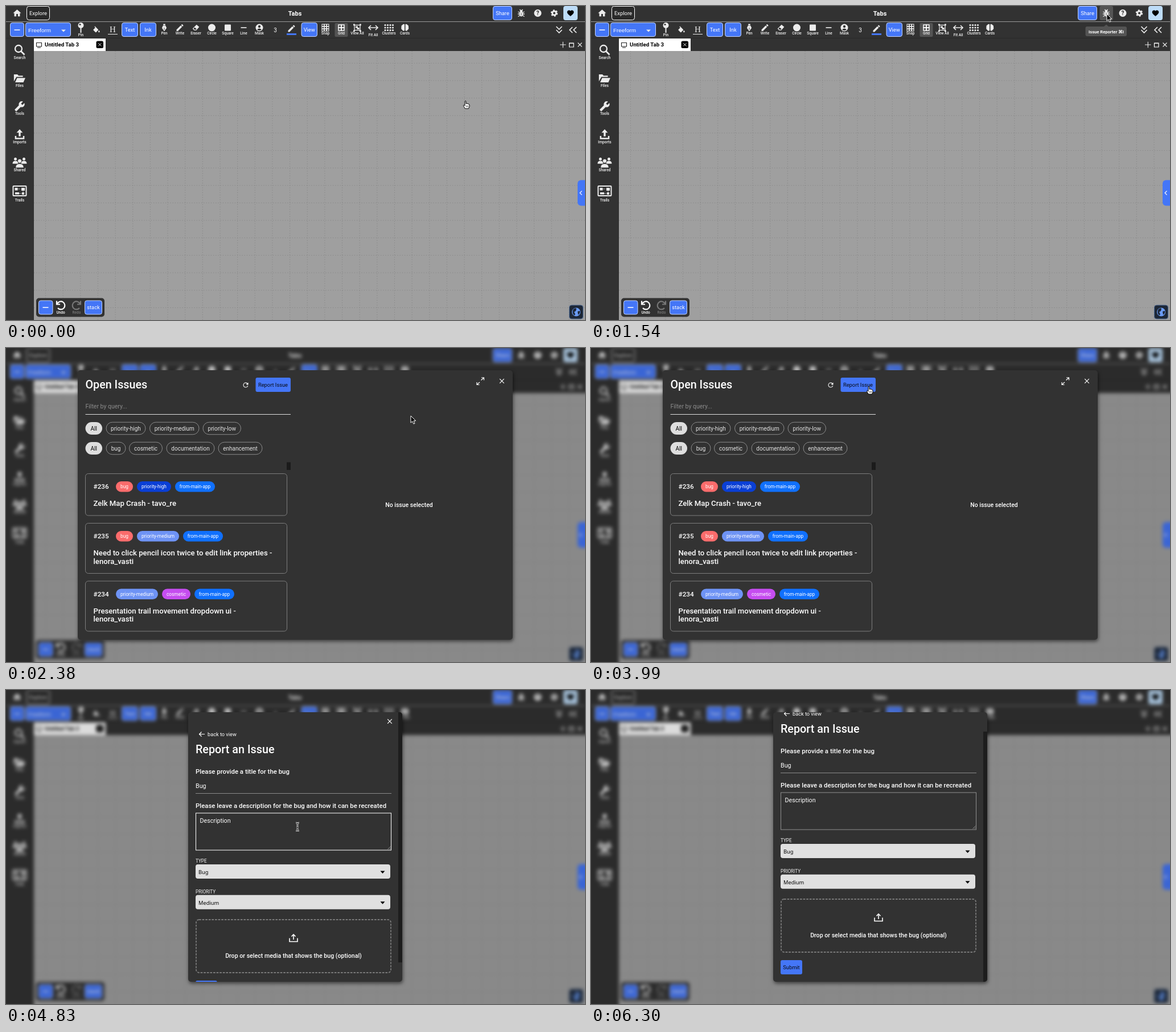
Recreate the animation shown at these times as an HTML page. Size 1017x551 px, loop 6650 ms.

```html
<!DOCTYPE html>
<html lang="en">
<head>
<meta charset="utf-8">
<title>Issue reporter</title>
<style>
  html, body { margin: 0; width: 100%; height: 100%; overflow: hidden; background: #323232; }
  svg { display: block; font-family: Roboto, "Open Sans", sans-serif; }
  .modal { filter: drop-shadow(1px 3px 3px rgba(0, 0, 0, .55)); }
</style>
</head>
<body>
<svg id="stage" width="1017" height="551" viewBox="0 0 1017 551"></svg>
<script>
const DARK = '#323232', BLUE = '#4476f7', ICON = '#ececec';

// Drawing helpers: each returns SVG markup
const rect = (x, y, w, h, fill, r = 0, more = '') =>
  `<rect x="${x}" y="${y}" width="${w}" height="${h}" rx="${r}" fill="${fill}" ${more}/>`;
const text = (x, y, str, size, fill = '#fff', more = '') =>
  `<text x="${x}" y="${y}" font-size="${size}" fill="${fill}" ${more}>${str}</text>`;
const mid = (x, y, str, size, fill = '#fff', more = '') =>
  text(x, y, str, size, fill, 'text-anchor="middle" ' + more);
const line = (d, color = ICON, width = 1, more = '') =>
  `<path d="${d}" fill="none" stroke="${color}" stroke-width="${width}" ${more}/>`;
const shape = (d, fill = ICON) => `<path d="${d}" fill="${fill}"/>`;
const dot = (x, y, r, fill = ICON) => `<circle cx="${x}" cy="${y}" r="${r}" fill="${fill}"/>`;
const icon = (d, x, y, size, fill = ICON, flip = 1) =>
  `<path d="${d}" fill="${fill}" transform="translate(${x} ${y}) scale(${flip * size / 24} ${size / 24}) translate(-12 -12)"/>`;
const cross = (x, y, r, color = '#fff', w = 1.2) =>
  line(`M${x - r} ${y - r}l${2 * r} ${2 * r}m0 ${-2 * r}l${-2 * r} ${2 * r}`, color, w);
const button = (x, y, w, h, label) =>
  rect(x + .5, y + .5, w - 1, h - 1, BLUE, 3.5, 'stroke="#c3d3ff"') +
  mid(x + w / 2, y + h / 2 + 3.3, label, 9.3);
const minus = (x, y, w = 5) => line(`M${x - w} ${y}h${2 * w}`, '#fff', 1.5);
const medium = 'font-weight="500"', bold = 'font-weight="700"';

const PENCIL = 'M3 17.2V21h3.8L17.8 9.9 14 6.2zM20.7 7a1 1 0 000-1.4l-2.3-2.3a1 1 0 00-1.4 0l-1.8 1.8 3.8 3.8z';
const HOME = 'M10 20v-6h4v6h5v-8h3L12 3 2 12h3v8z';
const HEART = 'M12 21C5 15 2 12.3 2 8.500 2 5.400 4.400 3 7.500 3 9.200 3 11 3.800 12 5.100 13 3.800 14.800 3 16.500 3 19.600 3 22 5.400 22 8.500 22 12.300 19 15 12 21z';
const BUCKET = 'M16.600 9 7.600 0 6.200 1.400 8.600 3.800 3.400 9a1.500 1.500 0 0 0 0 2.100l5.500 5.500c.6.6 1.500.6 2.100 0l5.500-5.500c.6-.6.6-1.500.1-2.100zM19 11.500s-2 2.200-2 3.500a2 2 0 0 0 4 0c0-1.300-2-3.500-2-3.500z';
const WRENCH = 'M22.700 19l-9.100-9.100c.9-2.300.4-5-1.500-6.900-2-2-5-2.400-7.400-1.300L9 6 6 9 1.600 4.700C.4 7.100.9 10.100 2.900 12.100c1.900 1.900 4.600 2.400 6.900 1.500l9.100 9.100c.4.4 1 .4 1.400 0l2.300-2.300c.5-.4.5-1.100.1-1.400z';
const FOLDER = 'M3.500 20 7.500 11H24l-4 9zM1 18V4h7l2.500 2.500H19V9H6z';
const REFRESH = 'M17.650 6.350A8 8 0 1 0 19.700 14h-2.100A6 6 0 1 1 12 6c1.700 0 3.100.7 4.200 1.800L13 11h7V4z';
const UPLOAD = 'M12 1 5.500 8H10v8h4V8h4.500zM2 15v7h20v-7h-3v4H5v-4z';
const PEN = 'M9 1h6v4H9zM8 6h8l3 7-7 10-7-10zM11.300 12v7h1.400v-7z';
const ERASER = 'M14 3l8 7-9 10H7l-5-5zM8 11l-3 4 3 3h4l2-2z';

function person(x, y, r) {
  return dot(x, y, r) + shape(`M${x - 2 * r} ${y + r * 3.300}q0 ${-r * 2} ${2 * r} ${-r * 2}t${2 * r} ${r * 2}z`);
}

function gridOf(x, y, cols, rows, gap, draw) {
  let out = '';
  for (let i = 0; i < cols * rows; i++) out += draw(x + (i % cols) * gap, y + (i / cols | 0) * gap);
  return out;
}

function board() {
  let d = '';
  for (let x = 69.500; x < 1017; x += 30.650) d += `M${x} 79V551`;
  for (let y = 100.300; y < 551; y += 30.650) d += `M49 ${y}H1017`;
  return rect(49, 79, 1000, 510, '#9f9f9f') + line(d, '#858585', .9, 'stroke-dasharray="1.3 2.9"');
}

function topBar() {
  const gear = dot(963, 12.500, 4.800) +
    `<circle cx="963" cy="12.500" r="5.200" fill="none" stroke="${ICON}" stroke-width="2.200" stroke-dasharray="2.700 2.745"/>` +
    dot(963, 12.500, 1.900, DARK);
  const bug = `<ellipse cx="905" cy="14" rx="3.200" ry="4.300" fill="${ICON}"/>` + dot(905, 9.300, 2.300) +
    line('M899.500 10l3 2m5 0l3-2M899 14h12M899.500 18.500l3-2m5 0l3 2M902.500 6l1.500 2m2 0l1.500-2', ICON, 1.300) +
    line('M904 13h2m-2 2.500h2', DARK, .9);
  return icon(HOME, 19.500, 12.500, 17) +
    rect(36.500, .5, 40, 24, '#2a2a2a', 4, 'stroke="#fff"') + mid(56.500, 16, 'Explore', 9.400) +
    mid(507.500, 16.500, 'Tabs', 11, '#fff', bold) +
    button(855, 0, 34, 25, 'Share') +
    '<g id="hover">' + rect(893.500, 0, 23.500, 25, '#545454', 3) + '</g>' + bug +
    dot(934, 12.500, 6.500) + mid(934, 16, '?', 10, DARK, bold) + gear +
    rect(979, 0, 25, 25, '#bddcf8', 4) + icon(HEART, 991.500, 12.700, 14, '#000') +
    rect(0, 27, 1017, 1, '#999');
}

function toolBar() {
  const label = (x, str, y = 50) => mid(x, y, str, 6.500, '#f2f2f2', medium);
  const names = [[278, 'Pen'], [305.500, 'Write'], [333.500, 'Eraser'], [361.500, 'Circle'], [389.500, 'Square'],
    [417.500, 'Line'], [445, 'Mask'], [561, 'Snap'], [617, 'View All'], [672.500, 'Clusters'], [700.500, 'Cards']];
  return button(7, 29, 25, 25, '') + minus(19.500, 42) +
    button(34, 29, 80, 25, '') +
    text(39, 46, 'Freeform', 9.900, '#fff', 'font-family="Liberation Sans, Arial, sans-serif"') +
    shape('M97 41.500h8l-4 4z') +
    dot(131.500, 34, 5) + dot(130, 32.500, 1.500, DARK) + rect(130.500, 38, 2, 9, ICON) + label(131.500, 'Pin', 53) +
    icon(BUCKET, 159, 43, 15) +
    mid(187.500, 46, 'H', 15, ICON, 'font-family="Liberation Serif, Noto Serif, serif"') + line('M179 49.500h17') +
    button(203, 29, 29, 25, 'Text') + button(235, 29, 29, 25, 'Ink') +
    rect(577.500, 30, 23, 24, '#545454', 2) + names.map(([x, s]) => label(x, s)).join('') +
    label(589, 'Grid') + label(645, 'Fit All', 53) +
    icon(PEN, 278, 38, 14, ICON) + icon(PENCIL, 305.500, 38, 16) + icon(ERASER, 333.500, 38, 14) +
    dot(361.500, 38, 6.500) + rect(384, 32.500, 11, 11, ICON, 1) + minus(417.500, 38) +
    dot(445, 38, 6.500) + dot(445, 36, 2.200, DARK) + shape('M441 41.500q4-4 8 0q-4 3-8 0z', DARK) +
    mid(473, 45.500, '3', 10) + icon(PENCIL, 501.500, 39.500, 16) + rect(493, 48, 17, 3, BLUE) +
    button(518.500, 29, 28.500, 25, 'View') +
    gridOf(555, 32, 3, 3, 4.200, (x, y) => rect(x, y, 3.600, 3.600, 'none', 0, `stroke="${ICON}" stroke-width="1.100"`)) +
    gridOf(584, 33, 2, 2, 5, (x, y) => rect(x, y, 5, 5, 'none', 0, 'stroke="#fff" stroke-width="1.400"')) +
    rect(612, 33.500, 10, 9, 'none', 0, `stroke="${ICON}" stroke-width="1.300"`) + rect(614, 35.500, 4, 3, ICON) + rect(616.500, 38, 4, 3, ICON) +
    gridOf(610, 31.500, 2, 2, 11, (x, y) => rect(x, y, 2.800, 2.800, ICON)) +
    line('M637.500 38h15M641 34l-4 4 4 4M649 34l4 4-4 4', ICON, 1.700) +
    gridOf(666, 33.500, 4, 3, 4.500, (x, y) => dot(x, y, 1.600)) +
    shape('M700 32q-2-1-3.500 1-2.500 1-2 4-1 3 1.500 5 2 3 4 1zM701.500 32q2-1 3.500 1 2.500 1 2 4 1 3-1.500 5-2 3-4 1z') +
    line('M966.500 36l5 5 5-5m-10 6l5 5 5-5M995 37l-5 5 5 5m7-10l-5 5 5 5', ICON, 1.700);
}

function tabRow() {
  return rect(0, 56, 1017, .8, '#292929') + rect(49, 57, 126, 22, '#fff') +
    line('M53.500 64.500h9v6.500h-9zM55 73h6', '#222', 1.100) +
    text(68, 71, 'Untitled Tab 3', 9.700, '#000', bold) +
    rect(158.500, 61.500, 12.500, 12.500, '#000', 2.500) + cross(164.800, 67.800, 2.600, '#fff', .9) +
    line('M973 68h10.500M978.300 62.700v10.500', ICON, 1.100) +
    line('M989.500 65h7.500v7h-7.500zM989.500 65.500h7.500', '#fff', 1.200) + cross(1008, 68, 3.500, ICON, 1.100);
}

function sideBar() {
  const labels = [[93, 'Search'], [142, 'Files'], [191, 'Tools'], [240.500, 'Imports'], [290, 'Shared'], [342.500, 'Trails']];
  return labels.map(([y, s]) => mid(24, y, s, 6.700, '#f2f2f2', medium)).join('') +
    `<circle cx="22" cy="75" r="6" fill="none" stroke="${ICON}" stroke-width="2.300"/>` + line('M26.500 79.500l6 6', ICON, 2.600) +
    icon(FOLDER, 23.500, 127, 21) + icon(WRENCH, 24, 176, 19, ICON, -1) + icon(UPLOAD, 24, 225.500, 20) +
    person(16.500, 268.500, 2.500) + person(31.500, 268.500, 2.500) +
    `<g stroke="${DARK}" stroke-width=".8">${person(24, 272, 3.600)}</g>` +
    rect(12.500, 316, 23, 17, 'none', 1, `stroke="${ICON}" stroke-width="2"`) +
    rect(15.500, 319, 5, 4.500, ICON) + rect(27, 319, 6, 5, ICON) + rect(16, 327, 7, 3.500, ICON) + rect(28, 327, 4, 4, ICON) +
    line('M21 321h5m4 3.500v2M23 329h5', ICON, .9, 'stroke-dasharray="1.500 1"');
}

function corners() {
  const turn = (x, color, flip) => `<g transform="translate(${x} 525) scale(${flip} 1)">` +
    line('M-7-7.500v6h6M-6-2.500A7 7 0 1 1-5 5', color, 2.200) + '</g>';
  return rect(53, 512.500, 120, 33, DARK, 5) + button(57, 516.500, 25.500, 25, '') + minus(69.500, 529) +
    turn(96, '#fff', 1) + mid(96, 540, 'Undo', 6.500, '#fff', medium) +
    turn(124, '#777', -1) + mid(124, 540, 'Redo', 6.500, '#777', medium) +
    button(138, 516.500, 31, 25, 'stack') +
    rect(1004, 305.500, 40, 45, BLUE, 6) + line('M1011.500 324.500l-3.500 3.500 3.500 3.500', '#fff', 1.100) +
    rect(989.500, 525, 24, 24, '#1d2736', 4, 'stroke="#48658f"') + dot(1001.500, 537, 7.500, '#6a9bf5') +
    shape('M996 533q3-4 6-2l-1 4-3 2 2 4-2 2q-4-4-2-10zM1004 536l4-1q1 4-3 7z', '#1d2736');
}

function pill(x, y, w, h, label, size, fill, color, stroke = 'none') {
  return rect(x, y - h / 2, w, h, fill, h / 2, `stroke="${stroke}"`) + mid(x + w / 2, y + size * .35, label, size, color);
}

function issueList() {
  const TAG = {
    bug: [30, '#fb6c6c'], 'priority-high': [60, '#0a3fd6'], 'priority-medium': [74, '#6e93f5'],
    cosmetic: [50, '#c64df0'], 'from-main-app': [70, '#1070fd'],
  };
  const card = (y, h, id, tags, lines) => {
    let x = 193;
    return rect(139.500, y, 354, h, '#333', 5, 'stroke="#7d7d7d"') +
      text(153.500, y + 26.800, '#' + id, 11.700, '#fff', medium) +
      tags.map(tag => {
        const [w, color] = TAG[tag], out = pill(x, y + 22.700, w, 18.500, tag, 8.300, color, '#fff');
        x += w + 7;
        return out;
      }).join('') +
      lines.map((s, i) => text(153.500, y + 56.500 + i * 14.600, s, 13.150, '#fff', medium)).join('');
  };
  const chips = (y, list) => list.map(([x, w, s], i) => i
    ? pill(x, y, w, 21.500, s, 10, 'none', '#e4e4e4', '#8b8b8b')
    : pill(x, y, w, 22, s, 10, '#dedede', '#000')).join('');
  return rect(126, 39, 764, 473, DARK, 5) +
    text(139.500, 71, 'Open Issues', 19.700, '#fff', medium) + icon(REFRESH, 421, 65, 13.500, '#fff') +
    rect(438.500, 52, 61.500, 25, BLUE, 3) + mid(469, 67.500, 'Report Issue', 9.300, '#080b14') +
    line('M834.500 56.500l5-4.500m-4.500 0h4.500v4.500M832 60l-5 4.500m0-4.500v4.500h4.500', '#fff', 1.200) + cross(871, 58, 3.800) +
    text(139.500, 106, 'Filter by query...', 10.500, '#8c8c8c') + rect(139.500, 116, 360.500, 1, '#e0e0e0') +
    chips(141, [[139.500, 29.500, 'All'], [176, 69, 'priority-high'], [252.500, 86.500, 'priority-medium'], [346, 66.500, 'priority-low']]) +
    chips(176, [[139.500, 29.500, 'All'], [176, 34, 'bug'], [216.500, 58, 'cosmetic'], [282, 84, 'documentation'], [373, 77, 'enhancement']]) +
    rect(493, 200.500, 7, 13.500, '#1b1b1b') +
    card(220.500, 73.500, 236, ['bug', 'priority-high', 'from-main-app'], ['Zelk Map Crash - tavo_re']) +
    card(307.500, 88, 235, ['bug', 'priority-medium', 'from-main-app'],
      ['Need to click pencil icon twice to edit link properties -', 'lenora_vasti']) +
    card(409, 88, 234, ['priority-medium', 'cosmetic', 'from-main-app'],
      ['Presentation trail movement dropdown ui -', 'lenora_vasti']) +
    mid(708, 278.500, 'No issue selected', 10.500, '#fff', medium);
}

function reportForm() {
  const select = (y, name, value) => text(333, y - 3, name, 8.200, '#f0f0f0') +
    rect(333, y, 342, 25, '#e0e0e0', 4) +
    text(338, y + 17, value, 9.300, '#000', 'font-family="Noto Sans, sans-serif"') + shape(`M657.500 ${y + 11.500}h8l-4 4.500z`, '#000');
  return rect(320, 39, 376, 473, DARK, 5) +
    '<g clip-path="url(#formClip)"><g id="content">' + cross(674, 55, 3.800) +
    line('M349 77.500h-9.500m4-4l-4 4 4 4', '#fff', 1.200) + text(354, 81, 'back to view', 9.200, '#fff') +
    text(333, 111, 'Report an Issue', 19.800, '#fff', medium) +
    text(333, 147, 'Please provide a title for the bug', 11.400, '#fff', medium) +
    text(333, 172, 'Bug', 10.700) + rect(333, 181, 344, 1, '#8a8a8a') +
    text(333, 206.500, 'Please leave a description for the bug and how it can be recreated', 11.400, '#fff', medium) +
    rect(333.500, 216, 343, 65, 'none', 0, 'id="area"') + text(340.500, 232.500, 'Description', 10.700) +
    line('M670.500 279.500l5-5m-2 5l2-2', '#aaa', .8) +
    select(306, 'TYPE', 'Bug') + select(359.800, 'PRIORITY', 'Medium') +
    rect(334, 403, 342, 93, 'none', 5, 'stroke="#787878" stroke-width="1.800" stroke-dasharray="3.700 1.900"') +
    line('M498 435.500v6h14v-6M505 438v-9m-3.500 3.500l3.500-3.500 3.500 3.500', '#fff', 1.600) +
    mid(505, 469.500, 'Drop or select media that shows the bug (optional)', 10.600, '#fff', medium) +
    rect(333, 510, 38, 25, BLUE, 3) + mid(352, 525.500, 'Submit', 9.300, '#080b14') +
    '</g>' + rect(689, 39, 7, 439, '#1d1d1d', 0, 'id="thumb"') + '</g>';
}

const outline = d => `<path d="${d}" stroke-width="1" stroke-linejoin="round"`;
const cursors = `<g id="arrow">${outline('M0 0V12.200L2.900 9.600 4.900 14.200 7 13.300 5 8.800H8.800Z')} fill="#000" stroke="#fff"/></g>
  <g id="hand">${outline('M-1 1.200Q0-.6 1 1.200V5.500L2.500 5 4 5.500 5.500 6 7 7V10.500L5.500 14H-.5L-3.500 9.500Q-4 7.600-2.500 8L-1 9.200Z')} fill="#fff" stroke="#000"/>${line('M1.300 8.500v3M3 8.500v3M4.700 8.500v3', '#000', .6)}</g>
  <g id="beam">${['#fff', '#111'].map((c, i) => line('M-3-7Q0-7 0-5 0-7 3-7M0-5V5M-3 7Q0 7 0 5 0 7 3 7M-1.500 1.500h3', c, 2.600 - i * 1.600)).join('')}</g>`;

document.getElementById('stage').innerHTML =
  `<clipPath id="formClip">${rect(320, 39, 376, 473, '#000', 5)}</clipPath>` +
  '<g id="app">' + rect(-30, -30, 1080, 620, DARK) + board() + topBar() + toolBar() + tabRow() + sideBar() + corners() + '</g>' +
  '<g id="tip">' + rect(868.500, 36, 72.500, 17, '#545454', 3) + shape('M901 36l4-3.500 4 3.500z', '#545454') +
  mid(905, 47.500, 'Issue Reporter ⌘I', 7.600, '#fff', bold) + '</g>' +
  rect(0, 0, 1017, 551, '#000', 0, 'id="shade"') +
  `<g id="list" class="modal">${issueList()}</g><g id="form" class="modal">${reportForm()}</g>` +
  `<g id="cursor">${cursors}</g>`;

const LOOP = 6650, STEP = 70, OPEN = 1540, FORM = 4060;
const START = [807, 166];
// begin, end, x, y
const MOVES = [
  [70, 770, 906, 14], [2030, 2380, 711, 119], [2590, 2800, 536, 77],
  [3010, 3570, 488, 67], [4410, 4830, 512, 240], [5810, 6300, 518, 562],
];
const $ = Object.fromEntries([...document.querySelectorAll('[id]')].map(e => [e.id, e]));
const clamp = v => Math.max(0, Math.min(1, v));
const ease = v => { const k = clamp(v); return k * k * (3 - 2 * k); };
const show = (el, on) => el.style.display = on ? '' : 'none';

function pointer(t) {
  let [x, y] = START;
  for (const [a, b, tx, ty] of MOVES) {
    const k = ease((t - a) / (b - a));
    x += (tx - x) * k;
    y += (ty - y) * k;
  }
  return [x, y];
}

function render(t) {
  const open = clamp((t - OPEN) / 210), form = t >= FORM;
  const scroll = 36 * ease((t - 4970) / 280);
  const [x, y] = pointer(t);
  const inArea = form && y > 216 - scroll && y < 281 - scroll;
  const onReport = !form && t > 3000 && x < 500;
  const kind = inArea ? 'beam' : onReport || (t < OPEN && y > 79) ? 'hand' : 'arrow';

  $.app.style.filter = open ? `blur(${3 * open}px)` : '';
  $.shade.setAttribute('opacity', .14 * open);
  show($.hover, t >= 700 && !open);
  show($.tip, t > 700 && !open);
  $.tip.setAttribute('opacity', clamp((t - 700) / 280));
  show($.list, open && !form);
  $.list.style.opacity = open;
  show($.form, form);
  $.content.setAttribute('transform', `translate(0 ${-scroll})`);
  $.thumb.setAttribute('y', 39 + scroll * 34 / 36);
  $.area.setAttribute('stroke', inArea ? '#fff' : '#909090');
  $.cursor.setAttribute('transform', `translate(${x} ${y})`);
  for (const name of ['arrow', 'hand', 'beam']) show($[name], name === kind);
}

const begin = performance.now();
let last = -1;
function tick() {
  const t = Math.floor((performance.now() - begin) % LOOP / STEP) * STEP;
  if (t !== last) render(last = t);
  requestAnimationFrame(tick);
}
tick();
</script>
</body>
</html>
```
